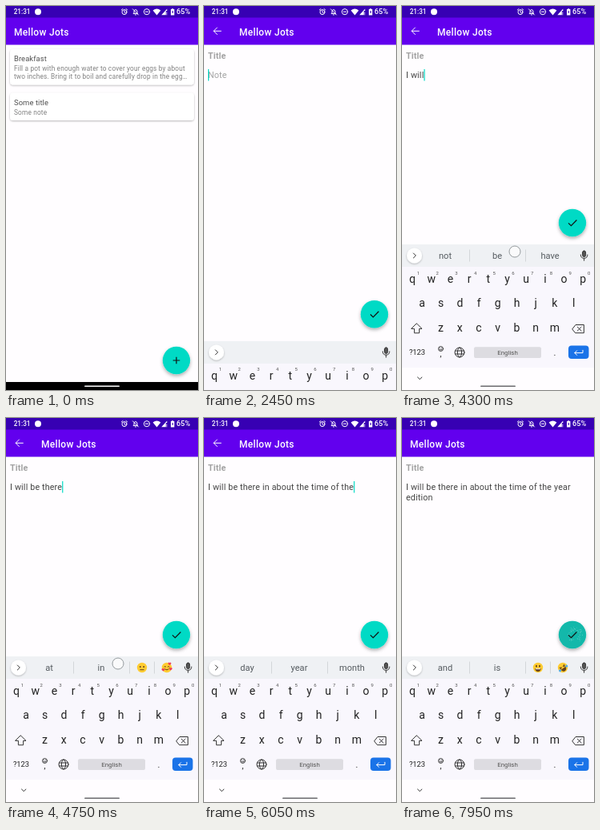
An HTML page for the animation above (8 s loop, 240 by 480 pixels).

```html
<!DOCTYPE html>
<html lang="en">
<head>
<meta charset="utf-8">
<title>Note app</title>
<style>
html, body { margin: 0; width: 100%; height: 100%; overflow: hidden; background: #fffdff; }
svg { display: block; width: 100vw; height: 100vh; }
text { font-family: Roboto, "Noto Sans", sans-serif; fill: #222; white-space: pre; }
.mid { text-anchor: middle; }
.status { font-weight: 500; fill: #fff; }
.bar { font-size: 12px; font-weight: 500; letter-spacing: .3px; fill: #fff; }
.head { font-size: 9.4px; letter-spacing: .09px; fill: #505050; }
.body { font-size: 8.3px; letter-spacing: .16px; fill: #808080; }
.field { font-size: 10.7px; letter-spacing: .17px; fill: #444; }
.hint { fill: #a3a3a3; }
.key { font-size: 14px; }
.num { font-size: 6px; fill: #555; }
.sug { font-size: 11.1px; fill: #555b60; }
.line { fill: none; stroke: #333; stroke-width: 1; stroke-linecap: round; stroke-linejoin: round; }
.white { stroke: #fff; }
</style>
</head>
<body>
<svg viewBox="0 0 240 480" id="stage">
  <defs>
    <filter id="lift" x="-20%" y="-30%" width="140%" height="170%">
      <feDropShadow dx="0" dy="1" stdDeviation="1.3" flood-opacity=".28"/>
    </filter>
    <filter id="float" x="-40%" y="-40%" width="180%" height="190%">
      <feDropShadow dx="0" dy="2.2" stdDeviation="2" flood-opacity=".32"/>
    </filter>
    <clipPath id="disc"><circle r="17.2"/></clipPath>
  </defs>

  <rect width="240" height="480" fill="#fffdff"/>

  <g id="list">
    <g fill="#fff" filter="url(#lift)">
      <rect x="5" y="54" width="230" height="44.5" rx="4"/>
      <rect x="5" y="108.5" width="230" height="34.5" rx="4"/>
    </g>
    <text class="head" x="10" y="69">Breakfast</text>
    <text class="body" x="10" y="81">Fill a pot with enough water to cover your eggs by about</text>
    <text class="body" x="10" y="91">two inches. Bring it to boil and carefully drop in the egg…</text>
    <text class="head" x="10" y="124">Some title</text>
    <text class="body" x="10" y="136">Some note</text>
  </g>

  <g id="editor">
    <text class="field hint" x="5" y="65.6" font-weight="700">Title</text>
    <text class="field hint" x="5" y="90" id="hint">Note</text>
    <text class="field" x="5" y="90" id="row1"></text>
    <text class="field" x="5" y="103" id="row2"></text>
    <path id="under" d="M5 92.5h3" stroke="#444" stroke-width=".8"/>
    <rect id="cursor" width="1.2" height="14.5" fill="#03dac5"/>
  </g>

  <rect y="14" width="240" height="34.5" fill="#6200ee"/>
  <rect width="240" height="14.5" fill="#3700b3"/>
  <text class="status" x="9.7" y="10.3" font-size="8.2">21:31</text>
  <circle cx="40" cy="7.2" r="4" fill="#fff"/>
  <g class="line white" stroke-width=".9">
    <circle cx="148" cy="7.6" r="3"/>
    <path d="M148 5.8v2l1.3 .8M144.3 5l1.7-1.5M151.7 5l-1.7-1.5"/>
    <path d="M159.2 9.6h5.4M160 9.4v-2.6q.3-2.2 2-2.2t2 2.2v2.6M161.6 11h.8M158.4 3.8l7 7.2"/>
    <circle cx="176" cy="7.2" r="3.6"/>
    <path d="M174.4 7.2h3.2"/>
  </g>
  <g fill="#fff">
    <path d="M183.6 5.4q4.9-3.8 9.8 0l-4.9 6z"/>
    <path d="M194.3 11.2l7-7.6v2.7h-1.5v4.9z"/>
    <path d="M200.3 8h1v1.6h-1zM200.3 10.3h1v.9h-1z"/>
    <path d="M207.2 3.2h2v.8h1.2v7.4h-4.400v-7.400h1.200z"/>
  </g>
  <path d="M208.2 6v3" stroke="#3700b3" stroke-width="1.1"/>
  <text class="status" x="213" y="10.4" font-size="9.2">65%</text>
  <path id="back" class="line white" stroke-width="1.3" d="M21.300 31.300h-9M16.400 27l-4.300 4.300 4.300 4.300"/>
  <text class="bar" id="title" y="36.6">Mellow Jots</text>

  <rect y="470" width="240" height="10" fill="#000"/>
  <rect x="98" y="474.500" width="44" height="1.600" rx=".8" fill="#fff"/>

  <g id="fab">
    <circle r="17.2" fill="#03dac5" filter="url(#float)"/>
    <g id="ripple" clip-path="url(#disc)">
      <circle id="wave" cx="3" cy="0" fill="#406a6a" fill-opacity=".3"/>
      <g id="specks" fill="#fff"></g>
    </g>
    <path id="plus" d="M-4.300 0h8.600M0-4.300v8.600" stroke="#111" stroke-width="1.200"/>
    <path id="check" d="M-5 .3l3.400 3.400 7-7.200" fill="none" stroke="#111" stroke-width="1.200"/>
  </g>

  <g id="board">
    <rect y="298" width="240" height="182" fill="#f9f7fd"/>
    <rect y="298" width="240" height="28" fill="#eff1f4"/>
    <rect y="452" width="240" height="28" fill="#fffdff"/>
    <circle cx="15.500" cy="312" r="9.500" fill="#fff" filter="url(#lift)"/>
    <path class="line" d="M14.300 309l3 3-3 3"/>
    <g id="strip"></g>
    <g class="line">
      <rect x="225.600" y="306" width="4" height="7.500" rx="2" fill="#555"/>
      <path d="M223.300 311q0 4.300 4.300 4.300t4.300-4.300M227.600 315.500v2.700"/>
    </g>
    <g id="keys"></g>
    <path class="line" d="M18.500 397l6.500 6.400h-3.400v5.400h-6.200v-5.400h-3.400z"/>
    <path class="line" d="M213 403.600l4-5.100h10.400v10.200H217zM219.300 401.200l4.800 4.800M224.100 401.200l-4.800 4.800"/>
    <text class="mid" x="19" y="436.400" font-size="9.300">?123</text>
    <circle class="line" cx="48.500" cy="428.500" r="3" stroke-width=".7"/>
    <path class="line" stroke-width=".7" d="M47 429.400q1.500 1.600 3 0M47.400 427.600v.1M49.600 427.600v.1"/>
    <text class="mid" x="48.500" y="438" font-size="10">,</text>
    <g class="line" stroke-width=".9">
      <circle cx="72" cy="433" r="6"/>
      <ellipse cx="72" cy="433" rx="2.600" ry="6"/>
      <path d="M66.600 431h10.800M66.600 435h10.800"/>
    </g>
    <rect x="90" y="426.300" width="84" height="13.600" rx="2" fill="#dddce1"/>
    <text class="mid" x="132" y="436" font-size="7.900" style="fill:#555">English</text>
    <text class="mid" x="191" y="437" font-size="11">.</text>
    <rect x="208" y="424.500" width="25.500" height="16.500" rx="4" fill="#1a73e8"/>
    <path class="line white" stroke-width="1.300" d="M226 430.300v3.300h-10M218.600 430.800l-2.800 2.800 2.800 2.800"/>
    <path class="line" d="M19.500 464l2.700 2.600 2.700-2.600" stroke-width=".9"/>
    <rect x="98" y="474.500" width="44" height="1.600" rx=".8" fill="#6b6a6e"/>
  </g>

  <circle id="touch" r="7" fill="#fff" fill-opacity=".65" stroke="#8b9094" stroke-width=".9"/>
</svg>

<script>
const LOOP = 8000;
const $ = id => document.getElementById(id);
const el = {};
document.querySelectorAll('svg [id]').forEach(e => el[e.id] = e);

// [time, first line, suggestions, second line]
const entries = [
  [0, '', []],
  [3400, 'i', ['i', 'I', "I'm"]],
  [4000, 'I', ['am', 'will', 'have']],
  [4200, 'I will', ['not', 'be', 'have']],
  [4400, 'I will be', ['in', 'there', 'at']],
  [4600, 'I will be there', ['at', 'in', ':flat', ':love']],
  [4800, 'I will be there in', ['a', 'about', 'the']],
  [5000, 'I will be there in about', ['a', 'the', 'an']],
  [5200, 'I will be there in about the', ['same', 'time', 'election']],
  [5400, 'I will be there in about the time', ['I', 'of', 'that']],
  [5700, 'I will be there in about the time of', ['my', 'the', 'year']],
  [6000, 'I will be there in about the time of the', ['day', 'year', 'month']],
  [6350, 'I will be there in about the time of the year', ['in', 'edition', 'I']],
  [7200, 'I will be there in about the time of the year', ['and', 'is', ':grin', ':rofl'], 'edition']
];

// [start, release, x, y]
const taps = [
  [1250, 1390, 217, 443],
  [2150, 2290, 30, 87],
  [3270, 3400, 179, 342],
  ...entries.slice(2).map(([t], i) => [t - 120, t, 139 + i % 3, 307 + i % 2]),
  [7650, 7790, 217, 272]
];
const presses = [1250, 7700];

const clamp = v => Math.max(0, Math.min(1, v));
const ease = v => 1 - (1 - clamp(v)) ** 3;
const show = (e, on) => e.setAttribute('visibility', on ? 'inherit' : 'hidden');
const label = (x, y, s, cls, extra = '') =>
  `<text class="mid ${cls}" x="${x}" y="${y}" ${extra}>${s}</text>`;

function drawKeys() {
  let out = '';
  [['qwertyuiop', 13, 346], ['asdfghjkl', 25, 376], ['zxcvbnm', 48.6, 407]].forEach(([row, x0, y], r) => {
    [...row].forEach((c, i) => {
      const x = x0 + i * 23.7;
      out += label(x, y, c, 'key');
      if (!r) out += label(x + 7.5, 335.5, (i + 1) % 10, 'num');
    });
  });
  el.keys.innerHTML = out;
}

const ink = 'fill="none" stroke="#65401b" stroke-width="1" stroke-linecap="round"';
const heart = (x, y) => `<path fill="#ef3d55" d="M${x} ${y}q-3-2-1.500-3.300 1-.6 1.500.5 .5-1.100 1.500-.5 1.500 1.300-1.500 3.300"/>`;
const faces = {
  flat: `<g fill="#65401b"><circle cx="-2.200" cy="-1" r="1"/><circle cx="2.200" cy="-1" r="1"/></g><path ${ink} d="M-2.200 2.700h4.400"/>`,
  love: `<path ${ink} d="M-3.200-1q1-1.300 2 0M1.200-1q1-1.300 2 0M-2.200 2q2.200 2 4.400 0"/>${heart(-4.500, 4.500)}${heart(4.800, 3.500)}${heart(3.500, -3)}`,
  grin: `<g fill="#65401b"><ellipse cx="-2" cy="-1.800" rx=".9" ry="1.400"/><ellipse cx="2" cy="-1.800" rx=".9" ry="1.400"/><path d="M-3.800 1h7.600q-.6 4-3.800 4t-3.800-4"/></g><path d="M-3 1.200h6v1h-6z" fill="#fff"/>`,
  rofl: `<g transform="rotate(-35)"><path ${ink} d="M-3.500-2l2 1-2 1M3.500-2l-2 1 2 1"/><path fill="#65401b" d="M-3.500 1h7q-.6 4-3.500 4t-3.500-4"/><g fill="#4aaef0"><circle cx="-5" cy="1.200" r="1.500"/><circle cx="5" cy="1.200" r="1.500"/></g></g>`
};
const face = (x, kind) =>
  `<g transform="translate(${x} 312)"><circle r="6.200" fill="#ffcc32"/>${faces[kind]}</g>`;

function stripFor(words) {
  if (!words.length) return '';
  const icons = words.length > 3;
  const rules = icons ? [84.500, 154.500, 185.500] : [84.500, 154.500];
  const xs = icons ? [54, 119, 170, 201] : [54, 119, 185];
  return rules.map(x => `<path d="M${x} 304.500v15" stroke="#d3d6d9"/>`).join('') +
    words.map((w, i) => w[0] === ':'
      ? face(xs[i], w.slice(1))
      : label(xs[i], 316, w, 'sug', w === 'I' && words[0] === 'i' ? 'font-weight="700"' : '')).join('');
}

function drawSpecks() {
  let seed = 7, out = '';
  const rnd = () => (seed = seed * 16807 % 2147483647) / 2147483647;
  for (let i = 0; i < 60; i++) {
    const a = rnd() * 6.283, r = 5 + rnd() * 5;
    out += `<circle cx="${(3 + r * Math.cos(a)).toFixed(1)}" cy="${(r * Math.sin(a)).toFixed(1)}" r=".35"/>`;
  }
  el.specks.innerHTML = out;
}

let current = null;
function setEntry(entry) {
  if (entry === current) return;
  current = entry;
  const [, first, words, second = ''] = entry;
  el.row1.textContent = first;
  el.row2.textContent = second;
  el.strip.innerHTML = stripFor(words);
  show(el.hint, !first);
  show(el.under, first === 'i');
  const row = second ? el.row2 : el.row1;
  const end = row.textContent ? row.getComputedTextLength() : 0;
  el.cursor.setAttribute('x', 5 + end);
  el.cursor.setAttribute('y', second ? 92 : 79);
}

function render(t) {
  const editing = t >= 1450;
  const arrow = t >= 1400 && t < 7900;
  show(el.list, !editing);
  show(el.editor, editing);
  show(el.plus, !editing);
  show(el.check, editing);
  show(el.back, arrow);
  el.title.setAttribute('x', arrow ? 44 : 10);

  setEntry(entries.filter(e => t >= e[0]).pop());
  show(el.cursor, t >= 2300 && t < 7900);

  const up = ease((t - 2400) / 400);
  show(el.board, up > 0);
  el.board.setAttribute('transform', `translate(0 ${182 * (1 - up)})`);
  el.fab.setAttribute('transform', `translate(213 ${443 - 172 * up})`);

  const press = presses.find(p => t >= p && t < p + 350);
  show(el.ripple, press !== undefined);
  if (press !== undefined) {
    const age = t - press;
    el.wave.setAttribute('r', 4 + 18 * ease(age / 260));
    el.specks.setAttribute('opacity', .6 * clamp(age / 100));
    el.ripple.setAttribute('opacity', clamp((350 - age) / 80));
  }

  const tap = taps.find(p => t >= p[0] && t < p[1]);
  show(el.touch, !!tap);
  if (tap) {
    el.touch.setAttribute('cx', tap[2]);
    el.touch.setAttribute('cy', tap[3]);
  }
}

drawKeys();
drawSpecks();
const start = performance.now();
function tick() {
  render((performance.now() - start) % LOOP);
  requestAnimationFrame(tick);
}
tick();
</script>
</body>
</html>
```
